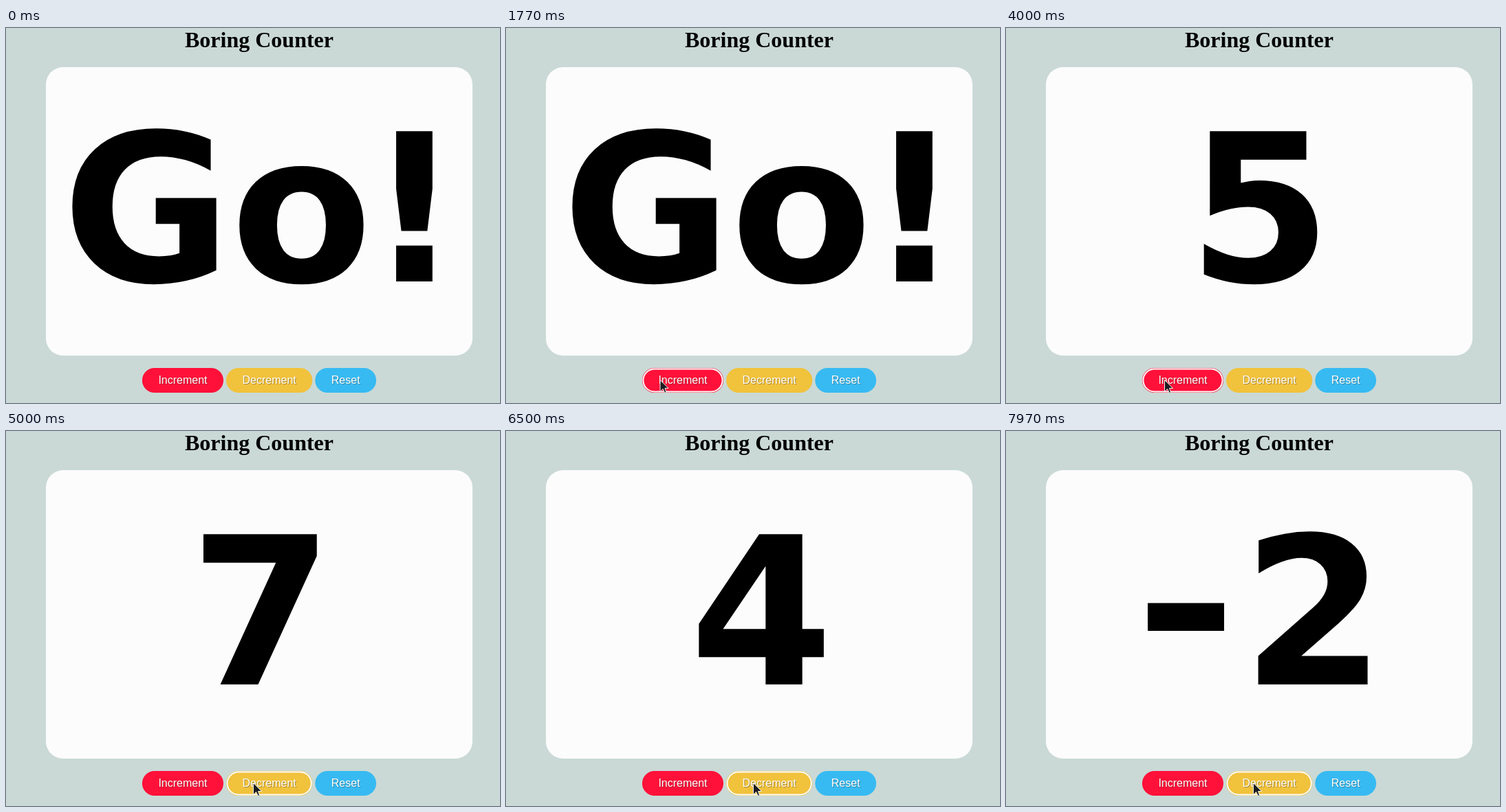
An HTML page with a canvas that plays this animation: 718x546 px, repeating every 8000 ms.

```html
<!DOCTYPE html>
<html lang="en">
<head>
<meta charset="utf-8">
<title>Boring Counter</title>
<style>
  html, body { margin: 0; width: 100%; height: 100%; overflow: hidden; background: #cad9d6; }
  canvas { display: block; width: 718px; height: 546px; }
</style>
</head>
<body>
<canvas id="stage"></canvas>
<script>
const W = 718, H = 546, LOOP = 8000;
const MID = 368, BASE = 369;
const BTN = { y: 495, h: 36, pad: 23.5, gap: 4, font: '16px "Liberation Sans", Arial, sans-serif' };
const COUNT_FONT = 'bold 300px "DejaVu Sans", sans-serif';

const canvas = document.getElementById('stage');
const ctx = canvas.getContext('2d');
const dpr = window.devicePixelRatio || 1;
canvas.width = W * dpr;
canvas.height = H * dpr;

// Click k comes at start + gap * k - rush * k²
const clicks = (count, start, gap, rush) =>
  Array.from({ length: count }, (_, k) => start + gap * k - rush * k * k);
const UP = clicks(7, 2300, 380, 0);
const DOWN = clicks(9, 5600, 412, 15);
const passed = (times, t) => times.filter(at => t >= at).length;

// Buttons sit side by side, each as wide as its label plus padding
function layout(buttons) {
  ctx.font = BTN.font;
  buttons.forEach(b => b.w = ctx.measureText(b.label).width + 2 * BTN.pad);
  const total = buttons.reduce((sum, b) => sum + b.w + BTN.gap, -BTN.gap);
  let x = MID - total / 2;
  for (const b of buttons) {
    b.x = x;
    x += b.w + BTN.gap;
  }
  return buttons;
}
const buttons = layout([
  { label: 'Increment', color: '#ff1139' },
  { label: 'Decrement', color: '#f1c23c' },
  { label: 'Reset', color: '#37baf2' }
]);

function glide(t, start, end) {
  const p = Math.min(1, Math.max(0, (t - start) / (end - start)));
  return p * p * (3 - 2 * p);
}

// The pointer rises from below, nudges right, then crosses to Decrement
function cursorAt(t) {
  return {
    x: 212 + 12 * glide(t, 900, 1350) + 6.5 * glide(t, 1850, 2150) + 129 * glide(t, 4640, 4920),
    y: 548 - 35.5 * glide(t, 900, 1350)
  };
}

function roundPath(x, y, w, h, r) {
  ctx.beginPath();
  ctx.roundRect(x, y, w, h, r);
}

// Draws a character with its ink centred on cx
function glyph(ch, cx) {
  const m = ctx.measureText(ch);
  ctx.fillText(ch, cx - (m.actualBoundingBoxRight - m.actualBoundingBoxLeft) / 2, BASE);
}

function drawCount(t) {
  ctx.fillStyle = '#000';
  ctx.font = COUNT_FONT;
  ctx.textAlign = 'left';
  if (t < UP[0]) {
    glyph('G', 201);
    glyph('o', 429.5);
    glyph('!', 593);
    return;
  }
  const n = passed(UP, t) - passed(DOWN, t);
  if (n < 0) ctx.fillRect(206, 250.5, 111, 40.5);
  glyph(String(Math.abs(n)), n < 0 ? 446 : 370);
}

function drawButton({ label, color, x, w }, cursor) {
  const { y, h } = BTN;
  roundPath(x, y, w, h, h / 2);
  ctx.fillStyle = color;
  ctx.fill();
  if (cursor.x > x && cursor.x < x + w && cursor.y < y + h) {
    roundPath(x + 1.5, y + 1.5, w - 3, h - 3, h / 2 - 1.5);
    ctx.strokeStyle = '#fcfcfc';
    ctx.lineWidth = 2;
    ctx.stroke();
  }
  ctx.font = BTN.font;
  ctx.textAlign = 'center';
  ctx.fillStyle = 'rgba(60, 50, 40, 0.4)';
  ctx.fillText(label, x + w / 2 + 1, 519);
  ctx.fillStyle = '#fff';
  ctx.fillText(label, x + w / 2, 518);
}

function drawCursor({ x, y }) {
  const arrow = [[0, 0], [0, 17], [4, 13], [7, 19], [9, 18], [7, 12], [12, 12]];
  ctx.beginPath();
  arrow.forEach(([dx, dy]) => ctx.lineTo(x + dx, y + dy));
  ctx.closePath();
  ctx.fillStyle = '#1c1c20';
  ctx.fill();
  ctx.strokeStyle = '#f0f0f0';
  ctx.lineWidth = 1;
  ctx.stroke();
}

function draw() {
  const t = performance.now() % LOOP;
  const cursor = cursorAt(t);
  ctx.setTransform(dpr, 0, 0, dpr, 0, 0);
  ctx.fillStyle = '#cad9d6';
  ctx.fillRect(0, 0, W, H);

  ctx.fillStyle = '#000';
  ctx.font = 'bold 32px "Liberation Serif", "Times New Roman", serif';
  ctx.textAlign = 'center';
  ctx.fillText('Boring Counter', MID, 28);

  roundPath(58, 57, 620, 420, 25);
  ctx.fillStyle = '#fcfcfc';
  ctx.fill();
  drawCount(t);
  buttons.forEach(b => drawButton(b, cursor));
  drawCursor(cursor);
  requestAnimationFrame(draw);
}

draw();
</script>
</body>
</html>
```
